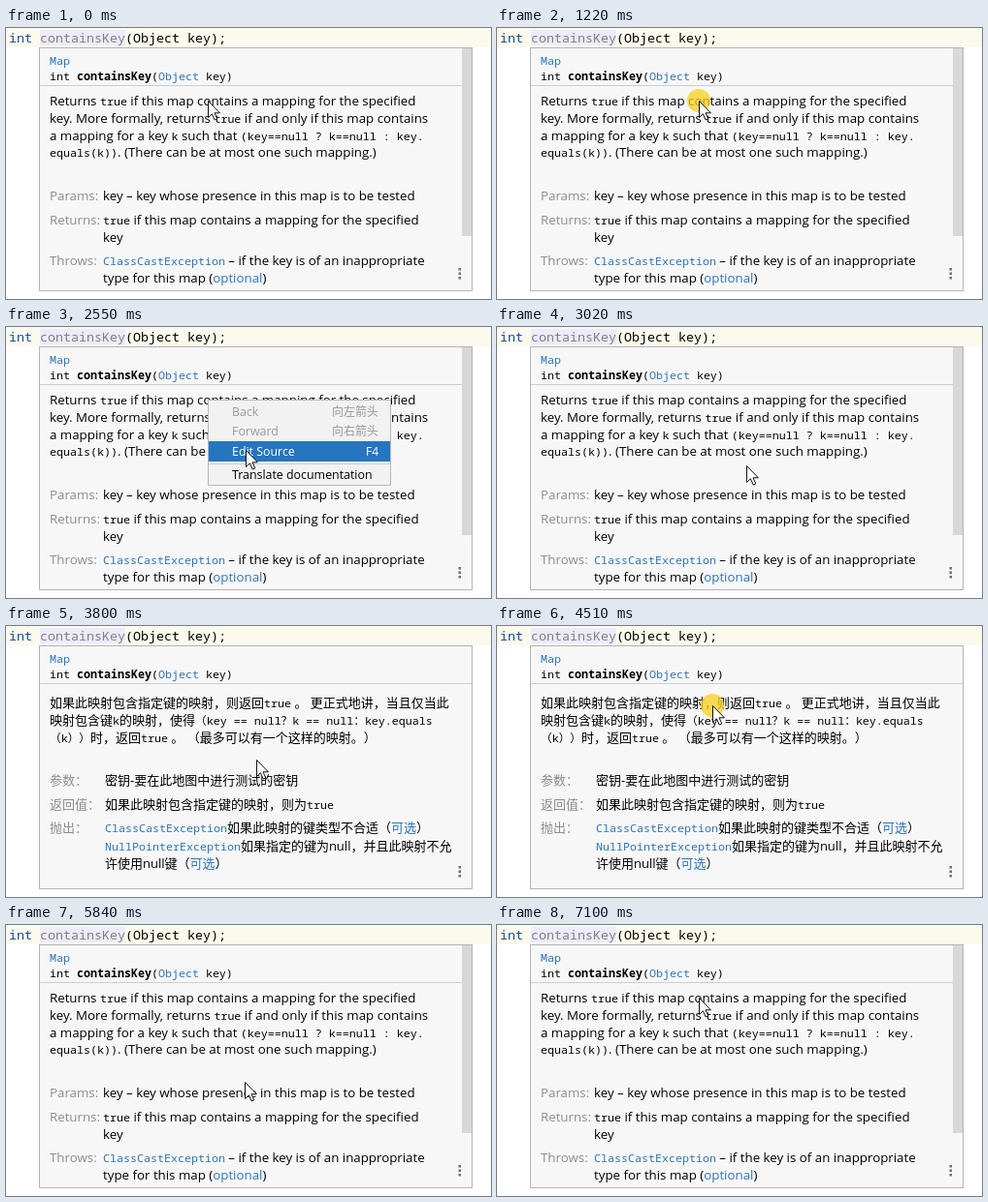
Write an HTML page that moves like this. It is 500 by 280 pixels and loops after 7.18 s.

```html
<!DOCTYPE html>
<html lang="en">
<head>
<meta charset="utf-8">
<title>Documentation popup</title>
<style>
html, body { margin: 0; width: 100%; height: 100%; overflow: hidden; background: #fff; }
svg { display: block; text-spacing-trim: space-all; }
text { font: 13.3px "Open Sans", "Noto Sans CJK SC", "Noto Sans CJK", sans-serif; fill: #000; }
#zh text { font-size: 13px; }
.m, #zh .m { font-family: "Noto Sans Mono", "Noto Sans CJK SC", monospace; font-size: 11.67px; }
text.code { font-size: 13.33px; }
#popup .l { fill: #2e74b5; }
#popup .g { fill: #8c8c8c; }
#menu text { font-size: 12.4px; }
#menu .off { fill: #999; }
#menu .end { text-anchor: end; font-size: 12px; }
#menu .hot text { fill: #fff; }
#menu .row { fill: none; }
#menu .hot .row { fill: #2675bf; }
#check { fill: none; stroke: #444; stroke-width: 2; }
#menu .hot #check { stroke: #fff; }
</style>
</head>
<body>
<svg width="500" height="280" viewBox="0 0 500 280">
  <rect width="500" height="20" fill="#fcfaed"/>
  <rect x="35" y="2" width="88" height="16" fill="#edebfc"/>
  <text class="m code" x="3" y="15"><tspan fill="#174a96">int</tspan> <tspan fill="#808080">containsKey</tspan>(Object key);</text>

  <g id="popup">
    <rect x="34.5" y="20.5" width="446" height="251" fill="#f7f7f7" stroke="#b4b4b4"/>
    <path d="M35 59.5H480" stroke="#cdcdcd"/>
    <text class="m l" x="45" y="38">Map</text>
    <text class="m" x="45" y="54">int <tspan font-weight="bold">containsKey</tspan>(<tspan class="l">Object</tspan> key)</text>

    <g id="en">
      <rect x="470" y="21" width="10" height="250" fill="#f7f7f7"/>
      <rect x="470" y="21" width="10" height="194" fill="#d8d8d8"/>
      <text x="45" y="80">Returns <tspan class="m">true</tspan> if this map contains a mapping for the specified</text>
      <text x="45" y="98">key. More formally, returns <tspan class="m">true</tspan> if and only if this map contains</text>
      <text x="45" y="116">a mapping for a key <tspan class="m">k</tspan> such that <tspan class="m">(key==null ? k==null : key.</tspan></text>
      <text x="45" y="133"><tspan class="m">equals(k))</tspan>. (There can be at most one such mapping.)</text>
      <text class="g" x="45" y="178">Params:</text>
      <text x="100" y="178">key – key whose presence in this map is to be tested</text>
      <text class="g" x="45" y="203">Returns:</text>
      <text x="100" y="203"><tspan class="m">true</tspan> if this map contains a mapping for the specified</text>
      <text x="100" y="221">key</text>
      <text class="g" x="45" y="245">Throws:</text>
      <text x="100" y="245"><tspan class="m l">ClassCastException</tspan> – if the key is of an inappropriate</text>
      <text x="100" y="263">type for this map (<tspan class="l">optional</tspan>)</text>
    </g>

    <g id="zh">
      <text x="45" y="84">如果此映射包含指定键的映射，则返回<tspan class="m">true</tspan> 。 更正式地讲，当且仅当此</text>
      <text x="45" y="102">映射包含键<tspan class="m">k</tspan>的映射，使得<tspan class="m">（key == null？k == null：key.equals</tspan></text>
      <text x="45" y="120"><tspan class="m">（k））</tspan>时，返回<tspan class="m">true</tspan> 。 （最多可以有一个这样的映射。）</text>
      <text class="g" x="45" y="164">参数：</text>
      <text x="102" y="164">密钥-要在此地图中进行测试的密钥</text>
      <text class="g" x="45" y="189">返回值：</text>
      <text x="102" y="189">如果此映射包含指定键的映射，则为<tspan class="m">true</tspan></text>
      <text class="g" x="45" y="213">抛出：</text>
      <text x="102" y="213"><tspan class="m l">ClassCastException</tspan>如果此映射的键类型不合适（<tspan class="l">可选</tspan>）</text>
      <text x="102" y="232"><tspan class="m l">NullPointerException</tspan>如果指定的键为null，并且此映射不允</text>
      <text x="102" y="250">许使用null键（<tspan class="l">可选</tspan>）</text>
    </g>

    <path d="M466.5 248h2.5v2.5h-2.5zm0 4.5h2.5v2.5h-2.5zm0 4.5h2.5v2.5h-2.5z" fill="#75687a"/>
  </g>

  <g id="menu">
    <rect x=".5" y=".5" width="188" height="88" fill="#f2f2f2" stroke="#b8b8b8"/>
    <text class="off" x="25" y="16.5">Back</text>
    <text class="off end" x="176" y="16.5">向左箭头</text>
    <text class="off" x="25" y="37">Forward</text>
    <text class="off end" x="176" y="37">向右箭头</text>
    <g id="edit">
      <rect class="row" x="1" y="43" width="187" height="21"/>
      <text x="25" y="57.5">Edit Source</text>
      <text class="end" x="176" y="57.5">F4</text>
    </g>
    <path d="M1 66.5H188" stroke="#cfcfcf"/>
    <g id="translate">
      <rect class="row" x="1" y="67" width="187" height="21"/>
      <path id="check" d="M7.5 78L11 82L17 73"/>
      <text x="25" y="82">Translate documentation</text>
    </g>
  </g>

  <circle id="press" r="12" fill="#f8cf1c" fill-opacity=".75"/>
  <path id="cursor" d="M.5 .5V17.5L4.4 13.8L7.2 20L9.8 18.9L7 12.8H12.4Z" fill="#fff" stroke="#111"/>
</svg>
<script>
const LOOP = 7180;
const $ = id => document.getElementById(id);

// [first step time, last step time, [step, x, y]...]
const moves = [
  [2080, 2710, [0, 208, 75], [1, 223, 86], [5, 243, 121], [9, 257, 143]],
  [3800, 4430, [0, 257, 143], [4, 262, 122], [9, 222, 82]],
  [4970, 5450, [0, 222, 82], [5, 244, 154], [7, 246, 162]],
  [6220, 7100, [0, 246, 162], [5, 214, 108], [9, 213, 83], [12, 208, 75]]
];
const presses = [[1220, 1380], [2940, 3020], [4510, 4660], [5600, 5680]];
const menus = [[1380, 3020, 208, 75], [4660, 5680, 222, 82]];

const during = (t, [from, to]) => t >= from && t < to;
const show = (id, on) => $(id).setAttribute('visibility', on ? 'visible' : 'hidden');
const place = (id, x, y) => $(id).setAttribute('transform', `translate(${x} ${y})`);

function pointer(t) {
  const [start, end, ...pts] = moves.findLast(m => t >= m[0]) || moves[0];
  if (t < start) return pts[0].slice(1);
  const last = pts.at(-1)[0];
  const step = Math.min(last, 1 + Math.floor((t - start) / (end - start) * (last - 1) + 1e-6));
  const i = pts.findIndex(p => p[0] >= step);
  const [a, ax, ay] = pts[i - 1], [b, bx, by] = pts[i];
  const f = (step - a) / (b - a);
  return [Math.round(ax + (bx - ax) * f), Math.round(ay + (by - ay) * f)];
}

function draw(t) {
  const [x, y] = pointer(t);
  const chinese = during(t, [3100, 5840]);
  show('en', !chinese);
  show('zh', chinese);
  place('cursor', x, y);
  place('press', x, y);
  show('press', presses.some(p => during(t, p)));

  const menu = menus.find(m => during(t, m));
  $('menu').style.display = menu ? '' : 'none';
  if (!menu) return;
  const [, , mx, my] = menu, dy = y - my;
  place('menu', mx, my);
  show('check', chinese);
  $('edit').classList.toggle('hot', dy >= 43 && dy < 64);
  $('translate').classList.toggle('hot', dy >= 67);
}

let begin;
function tick(now) {
  begin ??= now;
  draw((now - begin) % LOOP);
  requestAnimationFrame(tick);
}
draw(0);
requestAnimationFrame(tick);
</script>
</body>
</html>
```
